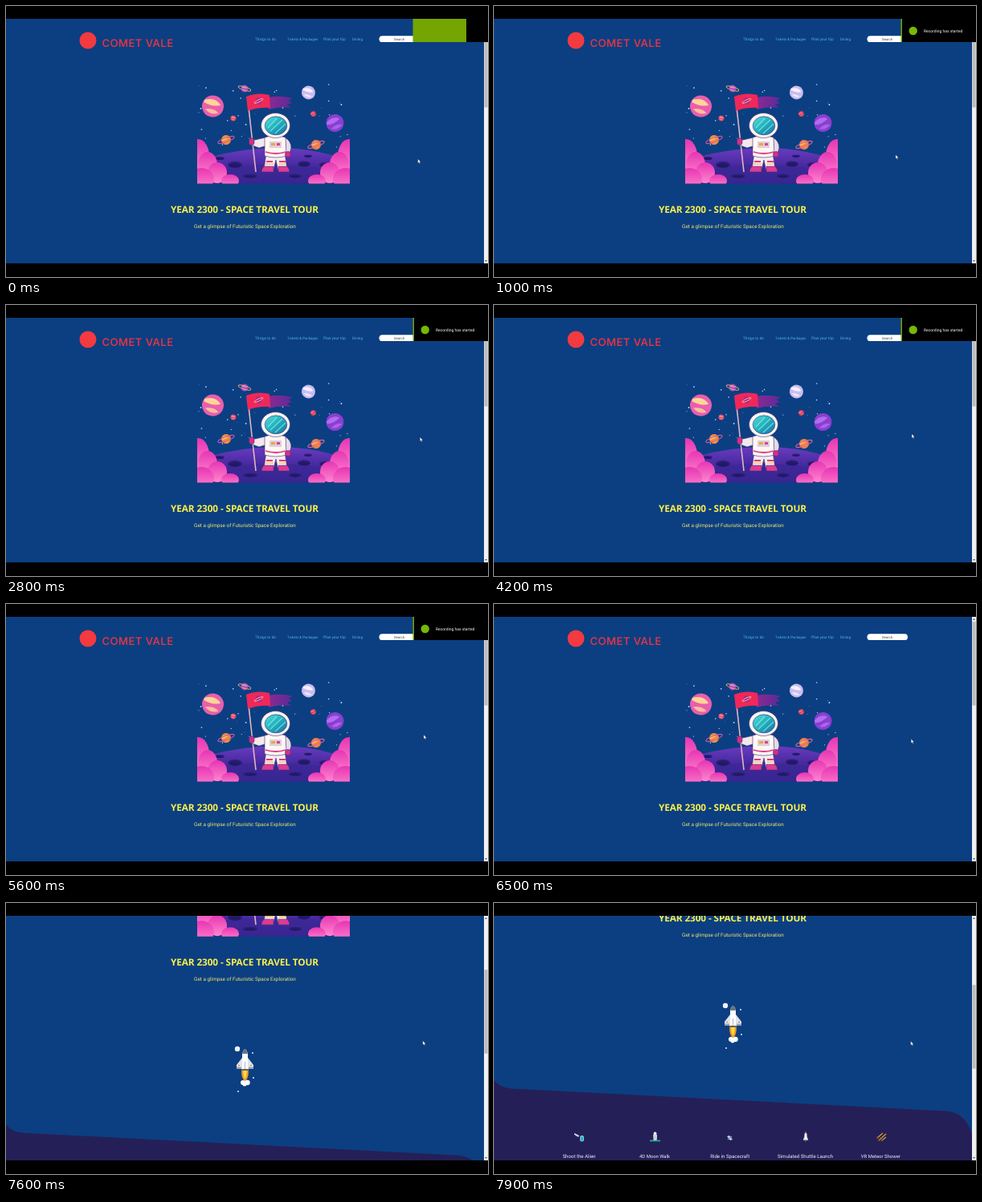
An HTML page for the animation above (8000 ms loop, 600x338 px).

```html
<!DOCTYPE html>
<html lang="en">
<head>
<meta charset="utf-8">
<title>Space travel tour</title>
<style>
  html, body { margin: 0; width: 100%; height: 100%; overflow: hidden; background: #000; }
  svg { display: block; width: 600px; height: 338px; }
  text { font-family: Roboto, "Open Sans", sans-serif; text-rendering: geometricPrecision; }
  .head { font-family: "Noto Sans", Roboto, sans-serif; font-stretch: 62.5%; font-weight: 800; letter-spacing: -.01em; }
  .brand { font-family: Inter, sans-serif; font-weight: 500; letter-spacing: .03em; }
</style>
</head>
<body>
<svg viewBox="0 0 600 338">
  <defs>
    <clipPath id="view"><rect y="16" width="600" height="305"/></clipPath>
    <clipPath id="art"><rect x="238" y="96" width="190" height="125.5"/></clipPath>
    <linearGradient id="ground" x2="0" y2="1">
      <stop stop-color="#6a3bc0"/><stop offset=".45" stop-color="#4a2ba2"/><stop offset="1" stop-color="#33248a"/>
    </linearGradient>
    <linearGradient id="cloud" x2="0" y2="1">
      <stop stop-color="#e735b4"/><stop offset="1" stop-color="#ff86cd"/>
    </linearGradient>
    <linearGradient id="glass" x2="1" y2="1">
      <stop stop-color="#4fe3dc"/><stop offset=".5" stop-color="#22aebd"/><stop offset="1" stop-color="#1c6fa5"/>
    </linearGradient>
    <linearGradient id="tail">
      <stop stop-color="#8c2a92"/><stop offset="1" stop-color="#5b2a98"/>
    </linearGradient>
  </defs>

  <rect width="600" height="338"/>
  <g clip-path="url(#view)">
    <rect y="16" width="595" height="305" fill="#0b3f82"/>
    <g id="page">
      <circle cx="102" cy="43" r="10.5" fill="#f23a40"/>
      <rect x="464.5" y="37.3" width="50.5" height="7.8" rx="3.9" fill="#fff"/>

      <g clip-path="url(#art)">
        <g id="stars" fill="#cfe6ff"></g>
        <g id="planets"></g>
        <path d="M238 193Q285 178 333 177T428 193V222H238Z" fill="url(#ground)"/>
        <path d="M238 206Q330 190 428 206V222H238Z" fill="#3a2794" opacity=".6"/>
        <g id="craters" fill="#2a1f78"></g>
        <g id="clouds"></g>

        <path d="M300.5 113L311 207" stroke="#e3b6bd" stroke-width="1.6"/>
        <path d="M326 114Q342 111 357 115L352 118L356 121L350 123L355 127Q340 125 327 129Z" fill="url(#tail)"/>
        <path d="M299 113Q313 107 328 111L329 127Q314 126 301 131Z" fill="#f0285a"/>
        <circle cx="314.500" cy="118.500" r="4.200" fill="#a92a86"/>
        <ellipse cx="314.500" cy="118.500" rx="6" ry="1.400" transform="rotate(-25 314.500 118.500)" fill="none" stroke="#ffc3a8" stroke-width=".8"/>

        <g stroke="#40317e" stroke-width=".6" stroke-linejoin="round">
          <path d="M323 164L310 167L305 166L304 173L315 177L325 174Z" fill="#f3e8ea"/>
          <path d="M347 164Q355 168 355 177L353 184L347 183L348 174Z" fill="#e7dbe6"/>
          <path d="M324 183H347L350 204H338.500L336 192L333 204H321Z" fill="#f6ecee"/>
          <path d="M322 164Q335 159 348 164L349 187Q336 191 322 187Z" fill="#fff7f2"/>
          <rect x="302.500" y="165" width="6.500" height="8.500" rx="3" fill="#d92c86"/>
          <circle cx="351" cy="185" r="3.600" fill="#d92c86"/>
          <path d="M321 200H333V207H318Q318 203 321 200ZM339 200H350Q353 203 353 207H339Z" fill="#df3b93"/>
          <ellipse cx="335.500" cy="149" rx="18" ry="15.500" fill="#fbf4f1"/>
          <ellipse cx="336" cy="149.300" rx="13.800" ry="11.500" fill="url(#glass)"/>
        </g>
        <path d="M326 152L337 140M329 156L344 142M335 159L348 147" stroke="#8cf4e8" stroke-width="1.500" opacity=".65"/>
        <path d="M328 169H343V177H328Z" fill="#d9cfdf"/>
        <path d="M330 171H335V174H330Z" fill="#f0a634"/>
        <path d="M337 171H341V174H337Z" fill="#e83b86"/>
        <path d="M323 182Q336 186 348 182M324 194H332M340 194H348" stroke="#dc3a86" stroke-width="1.800" fill="none"/>
        <path d="M323 197H333M340 197H349" stroke="#f2b63d" stroke-width="1.200"/>
      </g>

      <g id="rocket">
        <circle cx="288" cy="363" r="3.200" fill="#eef3f8"/>
        <g fill="#fff"><circle cx="307" cy="368" r=".9"/><circle cx="308" cy="399" r=".9"/><circle cx="289" cy="416" r=".9"/></g>
        <path d="M293.500 388H301.500Q303 398 297.500 404Q292 398 293.500 388Z" fill="#f5a01d"/>
        <path d="M295.500 389H299.500Q300 396 297.500 400Q295 396 295.500 389Z" fill="#ffd94a"/>
        <g fill="#fff"><circle cx="295" cy="405" r="3"/><circle cx="300.500" cy="405" r="3.200"/><circle cx="297" cy="407" r="2.500"/></g>
        <path d="M294 374L287 383V388H308V383L301 374Z" fill="#dfe4ea"/>
        <path d="M287 385.500H293V388H287ZM302 385.500H308V388H302Z" fill="#98a4b0"/>
        <path d="M294 390V370Q294.500 365 297.500 363Q300.500 365 301 370V390Z" fill="#fff"/>
        <path d="M294.300 369Q295 364.500 297.500 363Q300 364.500 300.700 369Z" fill="#66727f"/>
        <path d="M297.500 379V390" stroke="#b4bec8" stroke-width="1.200"/>
        <path d="M294 388H301V390H294Z" fill="#59636e"/>
        <path d="M289 383.500h2M304 383.500h2" stroke="#e8632c" stroke-width="1"/>
      </g>

      <path d="M0 456Q7 465.500 22 466.500L563 494.500Q588 497 595 524V700H0Z" fill="#251f57"/>
      <g id="icons">
        <path d="M100 522L106 525L105 527L100 524Z" fill="#d5dbe2"/>
        <rect x="107" y="525" width="5" height="7.500" rx="2" fill="#5cc9d6"/>
        <path d="M108.500 528h2M108.500 530h2" stroke="#22456b" stroke-width=".8"/>
        <path d="M194 531.500H207" stroke="#1fa99a" stroke-width="1.800"/>
        <path d="M198 524H203V528L202.500 531H198.500Z" fill="#c6d0dc"/>
        <circle cx="200.500" cy="522.500" r="2" fill="#eef2f7"/>
        <path d="M290 526L293 525L297 530L294 531Z" fill="#c9d4e4"/>
        <path d="M291 530L296 526" stroke="#7a9fd0" stroke-width="1.500"/>
        <path d="M385 529L388 524L391 529V531H385Z" fill="#aebccd"/>
        <path d="M386.500 530V523L388 520.500L389.500 523V530Z" fill="#f4f6f9"/>
        <path d="M387 530.500H389L388 533.500ZM387 522.500L388 520L389 522.500Z" fill="#e8503a"/>
        <path d="M477 528L484 522M479 531L488 523M483 531L488 527" stroke="#d99a2b" stroke-width="1.300"/>
        <g fill="#8f5a24"><circle cx="477.500" cy="527.800" r="1.300"/><circle cx="479.500" cy="530.800" r="1.300"/><circle cx="483" cy="531" r="1.200"/></g>
      </g>
      <g id="copy"></g>
    </g>

    <rect x="595" y="16" width="5" height="305" fill="#f1f1f1"/>
    <path d="M596 20L597.500 18L599 20ZM596 317L597.500 319L599 317Z" fill="#606060"/>
    <rect id="thumb" x="595.500" y="22" width="4" height="104.500" fill="#bcbcbc"/>

    <rect id="green" y="16" width="100" height="29" fill="#74a500"/>
    <rect id="black" y="16" width="100" height="29"/>
    <g id="notice"><circle cx="521.700" cy="31" r="5.200" fill="#76b900"/></g>
    <path id="cursor" d="M0 0V5.200L1.200 4.200L2 6L2.900 5.600L2.100 3.900H3.700Z" fill="#fff" stroke="#222" stroke-width=".35"/>
  </g>
</svg>

<script>
const NS = 'http://www.w3.org/2000/svg';
const $ = id => document.getElementById(id);

function add(parent, tag, attrs) {
  const el = document.createElementNS(NS, tag);
  for (const k in attrs) el.setAttribute(k, attrs[k]);
  parent.appendChild(el);
  return el;
}

// One line of type, cap height centred on cy, as large as max and the room allow.
function line(parent, str, x, cy, room, max, fill, cls = '', anchor = 'middle') {
  const el = add(parent, 'text', { x, fill, class: cls, 'text-anchor': anchor, 'font-size': 20 });
  el.textContent = str;
  const size = Math.min(max, 20 * room / el.getComputedTextLength());
  el.setAttribute('font-size', size.toFixed(2));
  el.setAttribute('y', (cy + size * .357).toFixed(2));
}

const copy = $('copy');
line(copy, 'COMET VALE', 119.5, 46.3, 89, 15, '#f5333f', 'brand', 'start');
[['Things to do', 310, 26], ['Tickets & Packages', 350, 38.5], ['Plan your trip', 395, 28], ['Dining', 431, 13]]
  .forEach(([s, x, w]) => line(copy, s, x, 41, w, 5.2, '#55b4ec', '', 'start'));
line(copy, 'Search', 489.5, 41.2, 13, 4.6, '#444');
line(copy, 'YEAR 2300 - SPACE TRAVEL TOUR', 297, 253.5, 184, 20, '#fbee4a', 'head');
line(copy, 'Get a glimpse of Futuristic Space Exploration', 297.5, 275, 127, 7, '#f1e56e');
[['Shoot the Alien', 106, 41], ['4D Moon Walk', 200, 38], ['Ride in Spacecraft', 293.7, 49],
 ['Simulated Shuttle Launch', 387.5, 69], ['VR Meteor Shower', 481.3, 49]]
  .forEach(([s, x, w]) => line(copy, s, x, 551, w, 6.6, '#eeeef6'));
line($('notice'), 'Recording has started', 535, 31, 48.5, 5.6, '#fff', '', 'start');

// x, y, radius, body, accent, ring
[[257.5, 125, 13.5, '#e85fae', '#ffd596', 0], [376.5, 108, 8.5, '#c9bdf0', '#f5efff', 0],
 [409.5, 146, 11, '#8a3fd0', '#b36cf0', 0], [283, 140, 3.5, '#e2476c', '#ff8a86', 0],
 [382.5, 134.5, 3.5, '#d63c5c', '#f5798a', 0], [297, 103, 4.5, '#a24bc4', '#d488e4', '#e89b6a'],
 [274, 167, 6, '#f08a3c', '#ffc06a', '#c9569a'], [386, 173, 6, '#f0803f', '#ffb765', '#d8609c']]
  .forEach(([x, y, r, body, accent, ring]) => {
    const g = add($('planets'), 'g', { transform: `translate(${x} ${y}) rotate(${ring && x < 290 || x > 380 ? -20 : 18})` });
    add(g, 'circle', { r, fill: body });
    add(g, 'path', { d: `M${-r * .9} ${-r * .35}Q0 ${-r * .9} ${r * .65} ${-r * .3}Q0 ${r * .1} ${-r * .9} ${-r * .1}Z`, fill: accent });
    add(g, 'path', { d: `M${-r * .6} ${r * .45}Q${r * .1} ${r * .1} ${r * .7} ${r * .45}Q0 ${r * .9} ${-r * .6} ${r * .45}Z`, fill: accent, opacity: .8 });
    if (ring) add(g, 'ellipse', { rx: r * 1.8, ry: r * .45, fill: 'none', stroke: ring, 'stroke-width': 1.1 });
  });

let seed = 11;
const rand = () => (seed = seed * 16807 % 2147483647) / 2147483647;
for (let i = 0; i < 48; i++)
  add($('stars'), 'circle', { cx: 240 + rand() * 185, cy: 98 + rand() * 78, r: .3 + rand() * .65 });

[[285, 198, 9, 4], [371, 197, 8, 3.5], [266, 190, 6, 2], [397, 198, 7, 3], [360, 212, 8, 2.5], [304, 212, 9, 2.5], [376, 187, 5, 1.5]]
  .forEach(([cx, cy, rx, ry]) => {
    add($('craters'), 'ellipse', { cx, cy, rx, ry });
    add($('craters'), 'ellipse', { cx, cy: cy + .8, rx: rx * .8, ry: ry * .65, fill: '#221966' });
  });

[[239, 187, 14, 21], [251, 198, 12, 16], [263, 208, 12, 13], [279, 218, 11, 8], [243, 216, 16, 14]].forEach(([x, cy, rx, ry]) =>
  [x, 666 - x].forEach(cx => add($('clouds'), 'ellipse', { cx, cy, rx, ry, fill: 'url(#cloud)' })));

const LOOP = 8000, STEP = 100;
const TRACKS = {
  x: [[0, 512.7], [600, 505], [1600, 492.3], [2100, 500], [2800, 515.3], [3700, 519], [4200, 520], [5500, 520], [6500, 519.2], [7100, 519], [7900, 518.7]],
  y: [[0, 190.7], [600, 188], [1600, 181.5], [2100, 175], [2800, 164.8], [3700, 162], [4200, 160.7], [4900, 160.7], [5000, 161.5], [5200, 161.5], [5300, 162.5], [5500, 162.5], [6500, 168.3], [6800, 168.3], [7100, 171], [7900, 172.3]],
  scroll: [[6800, 0], [6900, 24], [7000, 58], [7100, 88], [7900, 235]],
  bob: [[7100, -3], [7900, 0]],
  black: [[0, 573], [100, 538], [200, 514], [300, 508], [5800, 508], [6000, 535], [6200, 600]],
  green: [[6000, 506.5], [6200, 522], [6300, 548], [6400, 580], [6500, 600]],
  notice: [[200, 0], [500, 1], [5600, 1], [5900, 0]]
};

function at(name, t) {
  const keys = TRACKS[name];
  const i = keys.findIndex(k => k[0] > t);
  if (i === 0) return keys[0][1];
  if (i < 0) return keys[keys.length - 1][1];
  const [t0, a] = keys[i - 1], [t1, b] = keys[i];
  return a + (b - a) * (t - t0) / (t1 - t0);
}

const move = (id, x, y) => $(id).setAttribute('transform', `translate(${x} ${y})`);
const start = performance.now();

function draw(now) {
  const t = Math.floor(Math.max(0, now - start) % LOOP / STEP) * STEP;
  const scroll = at('scroll', t);
  move('page', 0, -scroll);
  move('thumb', 0, scroll * .341);
  move('rocket', 0, at('bob', t));
  move('green', at('green', t), 0);
  move('black', at('black', t), 0);
  move('cursor', at('x', t), at('y', t));
  $('notice').setAttribute('opacity', at('notice', t));
  requestAnimationFrame(draw);
}
draw(start);
</script>
</body>
</html>
```
